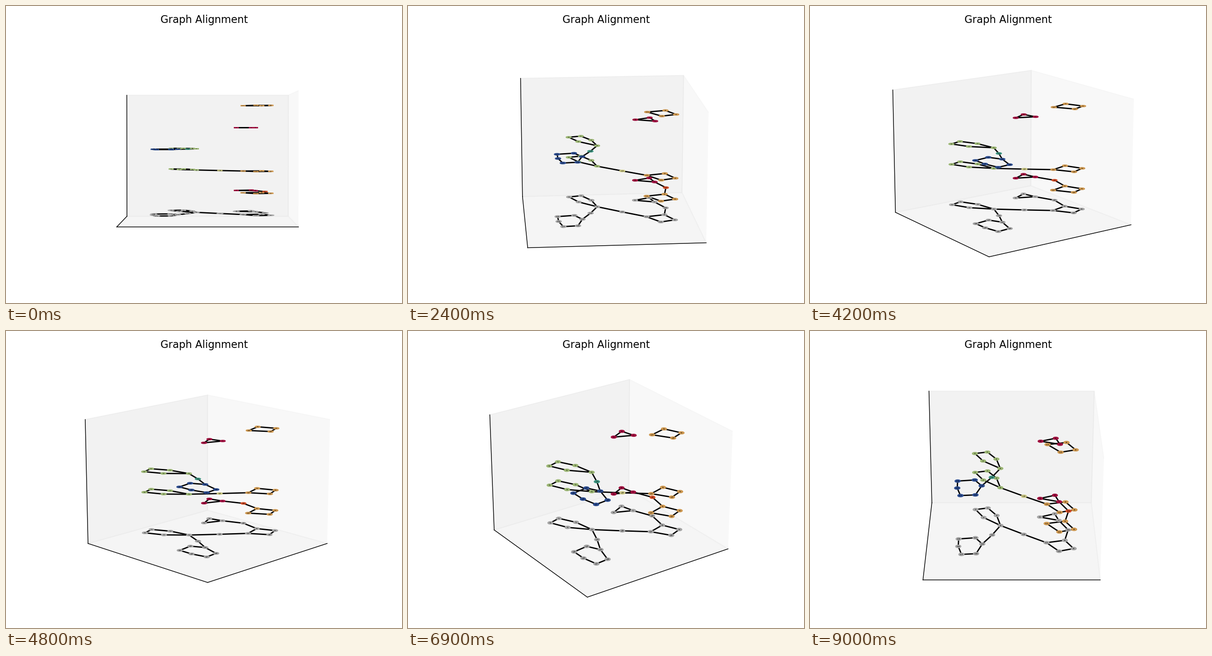
Write a matplotlib script that moves like this. It is 864x648 px and loops after 9.3 s.

```python
import matplotlib.pyplot as plt
from matplotlib.animation import FuncAnimation
from matplotlib.patches import Circle, PathPatch
from matplotlib.textpath import TextPath
from matplotlib.transforms import Affine2D
from mpl_toolkits.mplot3d import art3d

DPI = 135
W, H = 864, 648
FRAMES, INTERVAL = 31, 300
SIDE = 580                       # square 3D viewport, px
HALF_XY, HALF_Z = 0.5952, 0.4464
Z0, STEP = -0.390, 0.1491        # lowest layer and layer spacing
RADIUS = 0.0172

# Node positions in the plane, by group; the order gives the labels.
GROUPS = {
    "G": [(-0.263, 0.364), (-0.174, 0.390), (-0.108, 0.266),
          (-0.079, 0.105), (-0.202, 0.233)],
    "C": [(0.205, 0.241), (0.3125, 0.294), (0.3395, 0.186)],
    "O": [(0.372, -0.125), (0.429, -0.2495), (0.327, -0.289), (0.243, -0.161)],
    "T": [(-0.137, -0.043)],
    "B": [(-0.204, -0.181), (-0.254, -0.0865), (-0.371, -0.104),
          (-0.370, -0.217), (-0.344, -0.3355), (-0.244, -0.325)],
    "Y": [(0.0856, -0.034)],
    "R": [(0.4015, 0.036)],
}
LINKS = [("G3", "Y0"), ("Y0", "O3"), ("G3", "T0"), ("T0", "B0"),
         ("C2", "R0"), ("R0", "O0")]
COLORS = {
    "G": "#9bb673", "C": "#a00f3f", "O": "#ce9850", "T": "#3e9682",
    "B": "#2c4d91", "Y": "#cbc884", "R": "#d64e28",
}
GRAY = "#a5a5a5"
LAYERS = ["GCOTBYR", "CRO", "GYO", "GTB", "C", "O"]

nodes = {f"{g}{i}": p for g, pts in GROUPS.items() for i, p in enumerate(pts)}
labels = {name: str(i) for i, name in enumerate(nodes)}
edges = LINKS + [(f"{g}{i}", f"{g}{(i + 1) % len(pts)}")
                 for g, pts in GROUPS.items() if len(pts) > 1
                 for i in range(len(pts))]

fig = plt.figure(figsize=(W / DPI, H / DPI), dpi=DPI, facecolor="white")
ax = fig.add_axes([(W - SIDE) / 2 / W, 20.25 / H, SIDE / W, SIDE / H],
                  projection="3d", computed_zorder=False)
fig.text(0.5, 1 - 36.5 / H, "Graph Alignment", fontsize=12,
         ha="center", va="baseline")


def lay_flat(patch, z):
    """Place a 2D patch horizontally at height z."""
    ax.add_patch(patch)
    art3d.pathpatch_2d_to_3d(patch, z=z, zdir="z")


def label_patch(text, x, y, zorder):
    path = TextPath((0, 0), text, size=10)
    box = path.get_extents()
    cx, cy = (box.x0 + box.x1) / 2, (box.y0 + box.y1) / 2
    place = Affine2D().translate(-cx, -cy).scale(0.00165).translate(x, y)
    return PathPatch(place.transform_path(path), facecolor="black",
                     edgecolor="black", linewidth=0.2, alpha=0.5,
                     zorder=zorder)


def draw_layer(level, groups):
    z = Z0 + STEP * level
    for a, b in edges:
        if a[0] in groups and b[0] in groups:
            (xa, ya), (xb, yb) = nodes[a], nodes[b]
            ax.plot([xa, xb], [ya, yb], [z, z], color="black",
                    linewidth=1.5, zorder=2)
    for name, (x, y) in nodes.items():
        if name[0] in groups:
            color = COLORS[name[0]] if level else GRAY
            lay_flat(Circle((x, y), RADIUS, facecolor=color, edgecolor=color,
                            linewidth=1.4, zorder=3 + 2 * level), z)
            lay_flat(label_patch(labels[name], x, y, 4 + 2 * level), z)


for level, groups in enumerate(LAYERS):
    draw_layer(level, groups)

ax.set_xlim(-HALF_XY, HALF_XY)
ax.set_ylim(-HALF_XY, HALF_XY)
ax.set_zlim(-HALF_Z, HALF_Z)
ax.set_xticks([])
ax.set_yticks([])
ax.set_zticks([])
ax.grid(False)


def camera(i):
    """Tilt up, swing left, tilt up again, swing back."""
    elev = 1 + 2 * min(i, 7) + 2 * min(max(i - 16, 0), 5)
    swing = 5 * min(max(i - 7, 0), 9) - 5 * max(i - 21, 0)
    return elev, -90.001 - swing     # tiny offset keeps the side wall right


def update(i):
    elev, azim = camera(i)
    ax.view_init(elev=elev, azim=azim)
    return []


anim = FuncAnimation(fig, update, frames=FRAMES, interval=INTERVAL,
                     init_func=lambda: update(0), repeat=True,
                     repeat_delay=0, blit=False)
plt.show()
```
